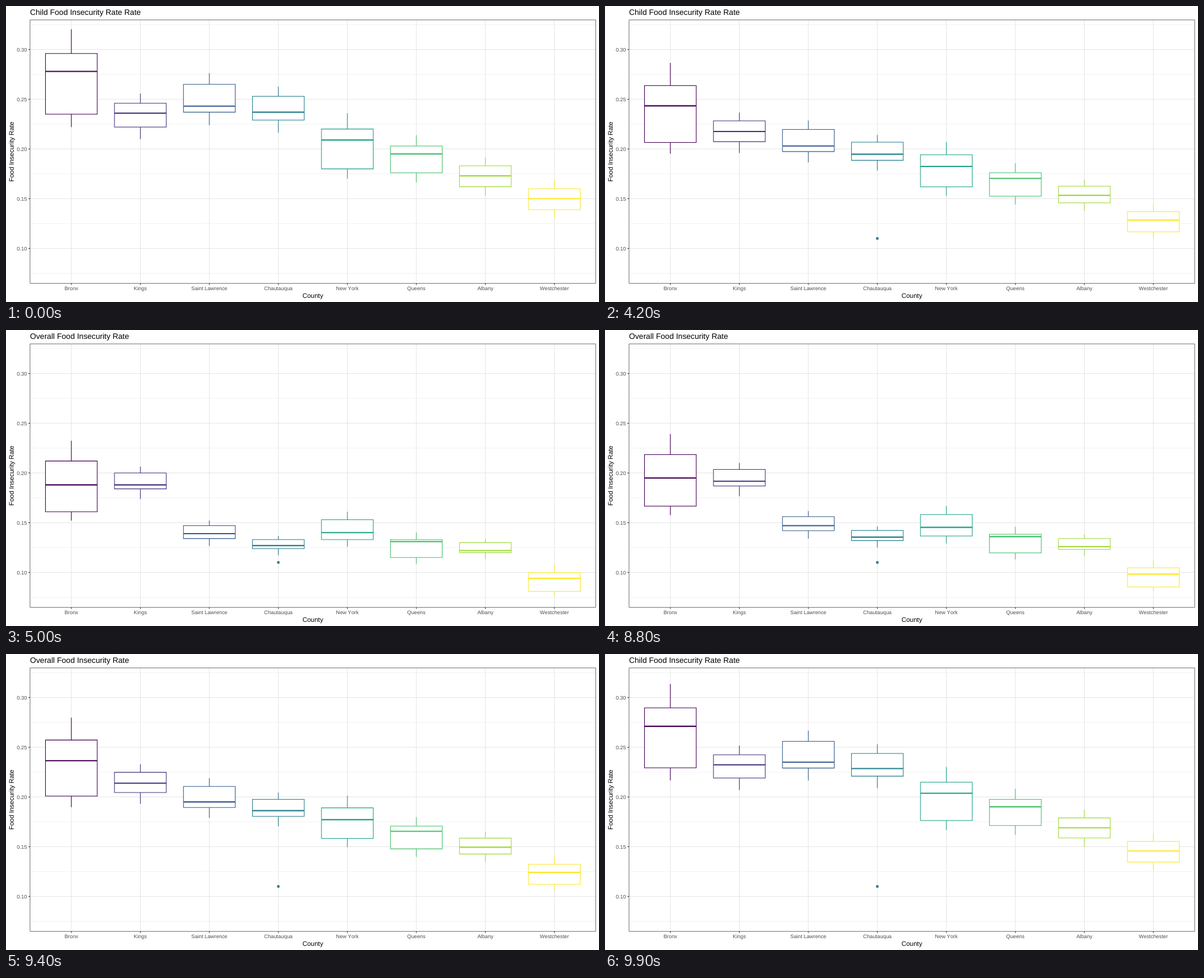
Write an HTML page that moves like this. It is 1000 px wide and 500 px high and loops after 10 s.

```html
<!DOCTYPE html>
<html lang="en">
<head>
<meta charset="utf-8">
<title>Food insecurity by county</title>
<style>
  html, body { margin: 0; width: 100%; height: 100%; overflow: hidden; background: #fff; }
  svg { display: block; width: 1000px; height: 500px; }
  text {
    font: 11px "Liberation Sans", Arial, sans-serif;
    font-kerning: none;
    text-rendering: geometricPrecision;
  }
  .tick { font-size: 8.8px; fill: #4d4d4d; }
  .title { font-size: 13.2px; }
</style>
</head>
<body>
<svg id="chart" viewBox="0 0 1000 500"></svg>
<script>
const LEFT = 40.5, RIGHT = 994.5, TOP = 23.5, BOTTOM = 468.5, BOX = 87.3;
const HOLD = 3800, STEP = 100, STEPS = 13, HALF = HOLD + (STEPS - 1) * STEP;
const titles = ["Child Food Insecurity Rate Rate", "Overall Food Insecurity Rate"];

// Quartiles in thousandths, highest first
const counties = [
  { name: "Bronx", color: "#440154", child: [296, 278, 235], overall: [212, 188, 161] },
  { name: "Kings", color: "#46337e", child: [246, 236, 222], overall: [200, 188, 184] },
  { name: "Saint Lawrence", color: "#365c8d", child: [265, 243, 237], overall: [147, 139, 134] },
  { name: "Chautauqua", color: "#277f8e", child: [253, 237, 229], overall: [133, 127, 124] },
  { name: "New York", color: "#1fa187", child: [220, 209, 180], overall: [153, 140, 133] },
  { name: "Queens", color: "#4ac16d", child: [203, 195, 176], overall: [133, 131, 115] },
  { name: "Albany", color: "#9fda3a", child: [183, 173, 162], overall: [130, 122, 120] },
  { name: "Westchester", color: "#fde725", child: [160, 150, 139], overall: [100, 94, 81] }
];

const svg = document.getElementById("chart");
const xAt = i => 110.2 + 116.36 * i;
const yAt = v => 73.5 + (300 - v) * 1.68;

function add(tag, attrs, text = "") {
  const el = document.createElementNS("http://www.w3.org/2000/svg", tag);
  for (const key in attrs) el.setAttribute(key, attrs[key]);
  el.textContent = text;
  return svg.appendChild(el);
}
const path = (d, stroke, width = 1.07, fill = "none") =>
  add("path", { d, stroke, "stroke-width": width, fill });
const label = (x, y, text, cls, anchor = "middle") =>
  add("text", { x, y, class: cls, "text-anchor": anchor }, text);

// Grid, minor lines first
for (let v = 75; v <= 325; v += 50) path(`M${LEFT} ${yAt(v)}H${RIGHT}`, "#ebebeb", 0.6);
for (let v = 100; v <= 300; v += 50) path(`M${LEFT} ${yAt(v)}H${RIGHT}`, "#e6e6e6");
counties.forEach((c, i) => path(`M${xAt(i)} ${TOP}V${BOTTOM}`, "#e6e6e6"));

const boxes = counties.map(({ color }) => ({
  whiskers: path("", color),
  body: path("", color, 1.07, "#fff"),
  median: path("", color, 2.13)
}));
const outlier = add("circle", { cx: xAt(3), cy: yAt(110), r: 2.35, fill: "#377f8c" });

// Frame, ticks and labels
path(`M${LEFT} ${TOP}H${RIGHT}V${BOTTOM}H${LEFT}Z`, "#777", 1);
for (let v = 100; v <= 300; v += 50) {
  path(`M37.8 ${yAt(v)}H${LEFT}`, "#333");
  label(35.3, yAt(v) + 3.1, (v / 1000).toFixed(2), "tick", "end");
}
counties.forEach(({ name }, i) => {
  path(`M${xAt(i)} ${BOTTOM}v2.8`, "#333");
  label(xAt(i), 480, name, "tick");
});
label(517.5, 493, "County", "axis");
label(0, 0, "Food Insecurity Rate", "axis").setAttribute("transform", "translate(13.3 246) rotate(-90)");
const title = label(40.5, 15, "", "title", "start");

function draw(ms) {
  const from = Math.floor(ms / HALF) % 2;
  const k = Math.max(0, Math.floor((ms % HALF - HOLD) / STEP) + 1);
  const mix = Math.abs(from - k / STEPS);

  title.textContent = titles[k > Math.ceil(STEPS / 2) ? 1 - from : from];
  outlier.setAttribute("visibility", mix > 0 ? "visible" : "hidden");
  boxes.forEach(({ whiskers, body, median }, i) => {
    const { child, overall } = counties[i];
    const [q3, mid, q1] = child.map((v, j) => v + (overall[j] - v) * mix);
    // Whisker ends follow from the box: spread above, level below
    const max = q3 + 0.4 * (q3 - q1), min = 0.945 * q1;
    const x = xAt(i), left = x - BOX / 2;
    whiskers.setAttribute("d", `M${x} ${yAt(max)}V${yAt(q3)}M${x} ${yAt(q1)}V${yAt(min)}`);
    body.setAttribute("d", `M${left} ${yAt(q3)}h${BOX}V${yAt(q1)}h${-BOX}Z`);
    median.setAttribute("d", `M${left} ${yAt(mid)}h${BOX}`);
  });
}

const start = performance.now();
function frame() {
  draw(performance.now() - start);
  requestAnimationFrame(frame);
}
frame();
</script>
</body>
</html>
```
